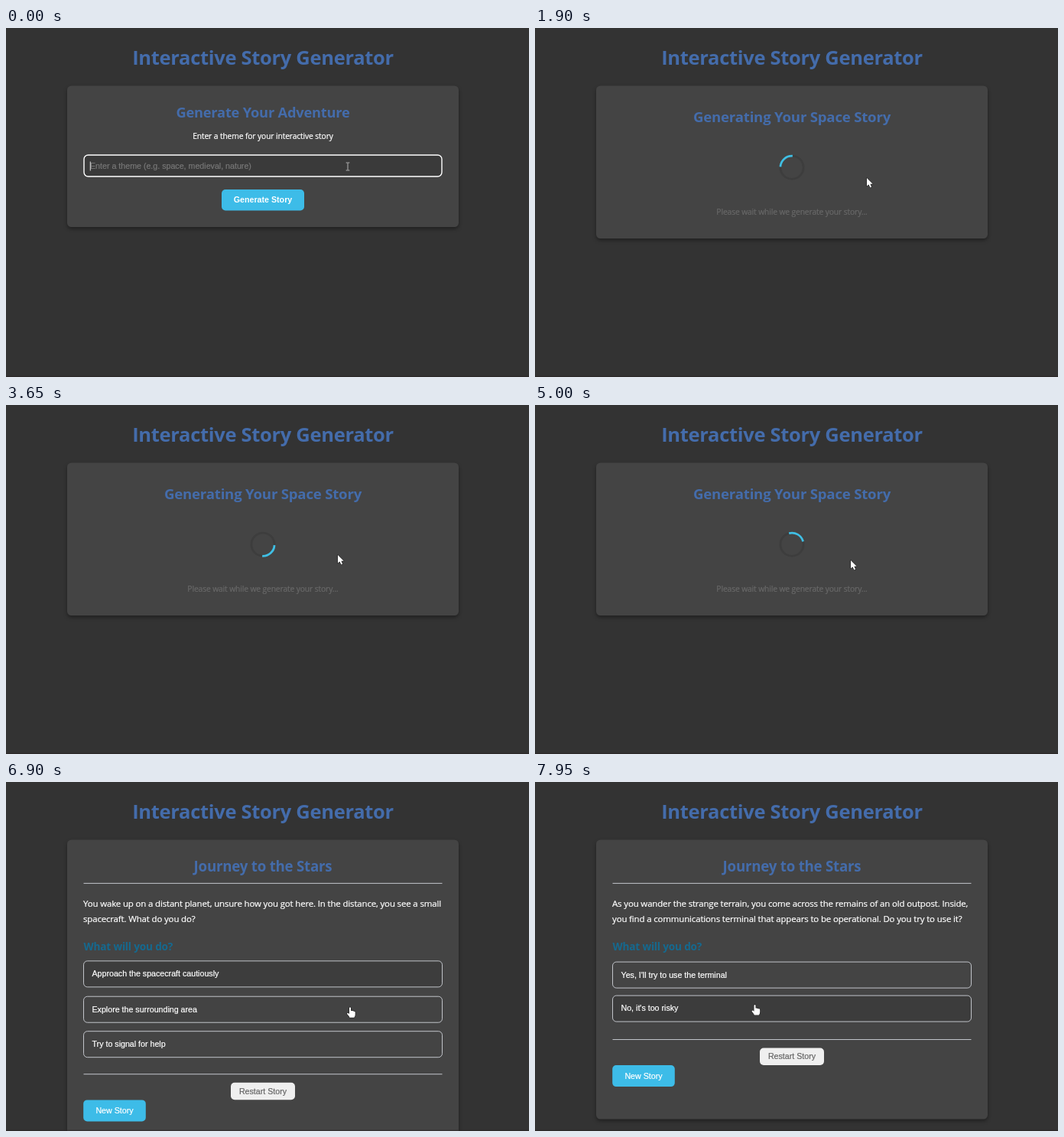
An HTML page with a canvas that plays this animation: 684 px wide and 456 px high, repeating every 8000 ms.

```html
<!DOCTYPE html>
<html lang="en">
<head>
<meta charset="utf-8">
<title>Interactive Story Generator</title>
<style>
html, body { margin: 0; width: 100%; height: 100%; overflow: hidden; background: #333; }
canvas { display: block; width: 684px; height: 456px; }
</style>
</head>
<body>
<canvas id="stage"></canvas>
<script>
const W = 684, H = 456, LOOP = 8000, STEP = 50;
const LOADING = 950, STORY = 6400, CHOICE = 7400;
const MID = 336, LEFT = 101.5, RIGHT = 570.5;
const UI = '"Open Sans", "Noto Sans", sans-serif';
const FORM = '"Liberation Sans", Arial, sans-serif';
const BLUE = '#446cab', CYAN = '#3dbce8', LINE = '#d0d3da';

const canvas = document.getElementById('stage');
const ctx = canvas.getContext('2d');
const dpr = window.devicePixelRatio || 1;
canvas.width = W * dpr;
canvas.height = H * dpr;

const scenes = [
  {
    lines: ['You wake up on a distant planet, unsure how you got here. In the distance, you see a small',
            'spacecraft. What do you do?'],
    options: ['Approach the spacecraft cautiously', 'Explore the surrounding area', 'Try to signal for help'],
    bottom: 486
  },
  {
    lines: ['As you wander the strange terrain, you come across the remains of an old outpost. Inside,',
            'you find a communications terminal that appears to be operational. Do you try to use it?'],
    options: ["Yes, I'll try to use the terminal", "No, it's too risky"],
    bottom: 440.5
  }
];

// Pointer stops: time, x, y
const path = [
  [0, 447, 181], [600, 447, 181], [900, 372, 224], [950, 372, 224],
  [1350, 434, 196], [4400, 434, 196], [4750, 406, 222], [5000, 413, 203],
  [5500, 514, 240], [5900, 467, 235], [6350, 467, 235], [6450, 467, 240],
  [6750, 467, 240], [6900, 450, 294], [7350, 450, 294], [7950, 287.5, 290.7]
];

const clamp = v => Math.max(0, Math.min(1, v));
const ramp = (t, from, span) => clamp((t - from) / span);

function pointerAt(t) {
  const i = path.findIndex(p => p[0] > t);
  if (i < 0) return path[path.length - 1].slice(1);
  const [t0, x0, y0] = path[i - 1], [t1, x1, y1] = path[i];
  let k = (t - t0) / (t1 - t0);
  k = k * k * (3 - 2 * k);
  return [x0 + (x1 - x0) * k, y0 + (y1 - y0) * k];
}

function text(str, x, y, size, color, { font = UI, weight = 400, align = 'left' } = {}) {
  ctx.font = `${weight} ${size}px ${font}`;
  ctx.letterSpacing = font === UI ? `${-0.012 * size}px` : '0px';
  ctx.textAlign = align;
  ctx.fillStyle = ctx.strokeStyle = color;
  ctx.fillText(str, x, y);
  if (weight === 400) {
    // slightly heavier strokes for small regular text
    ctx.lineWidth = 0.22;
    ctx.strokeText(str, x, y);
  }
}

const heading = (str, y, size) => text(str, MID, y, size, BLUE, { weight: 700, align: 'center' });

function box(x, y, w, h, r, fill, stroke, width = 1) {
  ctx.beginPath();
  ctx.roundRect(x, y, w, h, r);
  if (fill) { ctx.fillStyle = fill; ctx.fill(); }
  if (stroke) { ctx.strokeStyle = stroke; ctx.lineWidth = width; ctx.stroke(); }
}

function card(bottom) {
  ctx.save();
  ctx.shadowColor = 'rgba(0,0,0,0.38)';
  ctx.shadowBlur = 5 * dpr;
  ctx.shadowOffsetY = 2.6 * dpr;
  box(80, 75.5, 512, bottom - 75.5, 5.5, '#444');
  ctx.restore();
}

function rule(y) {
  ctx.fillStyle = LINE;
  ctx.fillRect(LEFT, y, RIGHT - LEFT, 0.9);
}

function drawForm(t) {
  card(260);
  heading('Generate Your Adventure', 116.5, 18.3);
  text('Enter a theme for your interactive story', MID, 145, 10.3, '#fff', { align: 'center' });
  box(102, 166, 468, 28, 5.5, '#3a3a3a', '#fff', 1.4);
  const typed = 'space'.slice(0, Math.ceil(t / 75));
  if (typed) text(typed, 110, 184, 10.67, '#fff', { font: FORM });
  else text('Enter a theme (e.g. space, medieval, nature)', 110, 184, 10.67, '#777', { font: FORM });
  ctx.fillStyle = '#eee';
  ctx.fillRect(109.8 + (typed ? ctx.measureText(typed).width : 0), 174.5, 0.9, 12);
  box(282, 211, 108, 27.5, 5, CYAN);
  text('Generate Story', MID, 228, 10.67, '#fff', { font: FORM, weight: 700, align: 'center' });
}

function drawLoading(t) {
  card(275);
  heading('Generating Your Space Story', 122.5, 18.65);
  const mid = (t - 958) / 500 * Math.PI * 2 - Math.PI / 2;
  ctx.lineWidth = 2.8;
  ctx.strokeStyle = '#3d3d3d';
  ctx.beginPath();
  ctx.arc(MID, 182.2, 15.1, 0, Math.PI * 2);
  ctx.stroke();
  ctx.strokeStyle = '#40bfe4';
  ctx.beginPath();
  ctx.arc(MID, 182.2, 15.1, mid - Math.PI / 4, mid + Math.PI / 4);
  ctx.stroke();
  text('Please wait while we generate your story...', MID, 243.5, 10.3, '#686868', { align: 'center' });
}

function drawStory(t) {
  const { lines, options, bottom } = scenes[t < CHOICE ? 0 : 1];
  card(bottom);
  heading('Journey to the Stars', 116.5, 18.7);
  rule(131.9);
  lines.forEach((line, i) => text(line, LEFT - 0.5, 163 + 20.2 * i, 11.44, '#fff'));
  text('What will you do?', LEFT, 219.5, 13.6, '#15698f', { weight: 700 });

  const hover = [ramp(t, STORY, 100) - ramp(t, 6890, 150), ramp(t, 6880, 150)];
  options.forEach((label, i) => {
    const h = hover[i] || 0, y = 235.1 + 45.3 * i - 1.33 * h, c = Math.round(68 - 8 * h);
    box(LEFT, y, RIGHT - LEFT, 34, 5, `rgb(${c},${c},${c})`, LINE, 0.9);
    text(label, 112.5, y + 20.4, 10.67, '#fff', { font: FORM });
  });

  const end = 245.4 + 45.3 * options.length;
  rule(end);
  box(294, end + 11.5, 84, 22.5, 5, '#efefef');
  text('Restart Story', MID, end + 26.4, 10.67, '#666', { font: FORM, align: 'center' });
  box(101.2, end + 34.1, 81.6, 28, 5, CYAN);
  text('New Story', 142, end + 51.6, 10.67, '#fff', { font: FORM, align: 'center' });
}

const arrow = new Path2D('M0 0V10.6L2.5 8.4L4.3 12.5L6.1 11.7L4.4 7.8H7.7Z');
const hand = new Path2D('M-1 1Q0 -.6 1 1V5Q2.2 4.2 2.9 5.3Q4.1 4.6 4.8 5.8Q6.5 5.2 6.7 7V10Q6.7 12 5.3 13.8H-.6Q-1.3 11.8 -3.8 9.3Q-4.4 7.4 -2.4 7.9L-1 9Z');
const beam = new Path2D('M-2.3 -5H-.6L0 -4.5L.6 -5H2.3M0 -4.5V4.5M-2.3 5H-.6L0 4.5L.6 5H2.3');

function drawPointer(t) {
  if (t > 0 && t < 600) return;
  const [x, y] = pointerAt(t);
  const onButton = t < LOADING && y > 211 && x < 390;
  ctx.save();
  ctx.translate(x, y);
  ctx.lineJoin = 'round';
  if (t < LOADING && y < 194) {
    ctx.strokeStyle = '#c4c4c4';
    ctx.lineWidth = 0.9;
    ctx.stroke(beam);
  } else {
    const shape = onButton || t >= STORY ? hand : arrow;
    ctx.strokeStyle = '#222';
    ctx.lineWidth = 1.2;
    ctx.stroke(shape);
    ctx.fillStyle = '#fff';
    ctx.fill(shape);
  }
  ctx.restore();
}

function draw(t) {
  ctx.setTransform(dpr, 0, 0, dpr, 0, 0);
  ctx.fillStyle = '#333';
  ctx.fillRect(0, 0, W, H);
  heading('Interactive Story Generator', 48.4, 25.5);
  if (t < LOADING) drawForm(t);
  else if (t < STORY) drawLoading(t);
  else drawStory(t);
  drawPointer(t);
  ctx.fillStyle = 'rgba(40,32,35,0.5)';
  ctx.fillRect(0, 454.5, W, 1.5);
}

const start = performance.now();
function tick() {
  const t = (performance.now() - start) % LOOP;
  draw(Math.floor(t / STEP) * STEP);
  requestAnimationFrame(tick);
}
tick();
</script>
</body>
</html>
```
